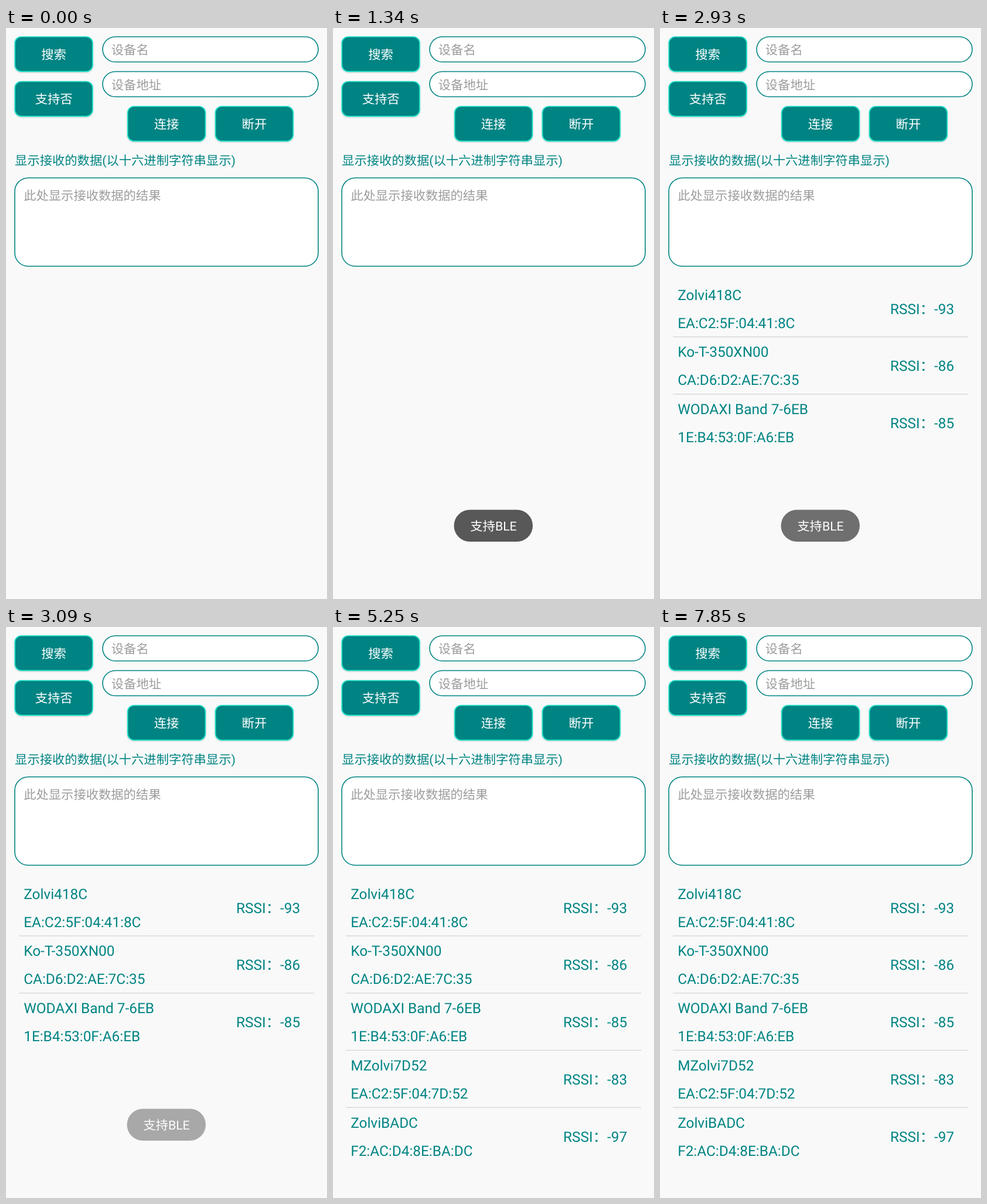
Recreate the animation shown at these times as an HTML page. Size 548x976 px, loop 8 s.

```html
<!DOCTYPE html>
<html lang="zh-CN">
<head>
<meta charset="utf-8">
<style>
html, body { margin: 0; height: 100%; overflow: hidden; background: #f9f9f9; }
svg {
  display: block; width: 100vw; height: 100vh; fill: #008483;
  font: 21.31px Roboto, "Noto Sans CJK SC", sans-serif; text-rendering: geometricPrecision;
}
.field { fill: #fff; stroke: #008483; stroke-width: 1.6; }
.hint { fill: #9c9c9c; }
.button rect { fill: #008483; stroke: #1ce6cb; stroke-width: 1.7; }
.button text, #toast text { fill: #fff; text-anchor: middle; }
.row { font-size: 24.36px; }
.row path { stroke: #dadada; stroke-width: 1.6; }
</style>
</head>
<body>
<svg id="stage" viewBox="0 0 548 976"></svg>
<script>
const LOOP = 8000, ROW_HEIGHT = 97.75, FADE = 500;
const TOAST_IN = 744, TOAST_OUT = 2737;
const LEFT = 15.1, INDENT = 30.2;

const text = (x, y, label, cls = "") => `<text x="${x}" y="${y}" class="${cls}">${label}</text>`;
const rect = (x, y, w, h, r, cls = "") =>
  `<rect x="${x}" y="${y}" width="${w}" height="${h}" rx="${r}" class="${cls}"/>`;
const button = (id, x, y, label) =>
  `<g class="button" id="${id}">${rect(x, y, 132.7, 59.3, 11)}${text(x + 66.4, y + 37.9, label)}</g>`;

const devices = [
  { at: 2240, name: "Zolvi418C", address: "EA:C2:5F:04:41:8C", rssi: -93 },
  { at: 2760, name: "Ko-T-350XN00", address: "CA:D6:D2:AE:7C:35", rssi: -86 },
  { at: 2920, name: "WODAXI Band 7-6EB", address: "1E:B4:53:0F:A6:EB", rssi: -85 },
  { at: 3740, name: "MZolvi7D52", address: "EA:C2:5F:04:7D:52", rssi: -83 },
  { at: 3820, name: "ZolviBADC", address: "F2:AC:D4:8E:BA:DC", rssi: -97 }
];
const row = ({ name, address, rssi }, i) =>
  `<g class="row" transform="translate(0 ${i * ROW_HEIGHT})">
    ${i ? '<path d="M22 430.2H526"/>' : ""}
    ${text(INDENT, 464.6, name)}${text(INDENT, 512.6, address)}${text(393.1, 488.6, "RSSI：" + rssi)}
  </g>`;

const stage = document.getElementById("stage");
stage.innerHTML =
  button("search", 15.2, 15, "搜索") +
  button("support", 15.2, 91.5, "支持否") +
  button("connect", 207.7, 134, "连接") +
  button("disconnect", 357.5, 134, "断开") +
  rect(165, 15, 368, 43, 21.5, "field") + text(179.8, 45.3, "设备名", "hint") +
  rect(165, 74.5, 368, 43, 21.5, "field") + text(179.8, 104.6, "设备地址", "hint") +
  text(LEFT, 234.3, "显示接收的数据(以十六进制字符串显示)") +
  rect(15, 256.2, 518, 151, 23, "field") + text(INDENT, 293.7, "此处显示接收数据的结果", "hint") +
  devices.map(row).join("") +
  `<g id="toast">${rect(206.5, 823.5, 134.5, 54.5, 27.2)}${text(274, 858.6, "支持BLE")}</g>`;

const rows = [...stage.querySelectorAll(".row")];
const buttons = [...stage.querySelectorAll(".button")];
const toast = document.getElementById("toast");
toast.firstChild.style.fill = "#585858";

const pressTimes = { support: 610, search: 2120 };
const clamp = v => Math.min(1, Math.max(0, v));

function draw(t) {
  rows.forEach((el, i) => el.style.display = t >= devices[i].at ? "" : "none");
  // Decelerating fade in, accelerating fade out
  const enter = clamp((t - TOAST_IN) / FADE), leave = clamp((t - TOAST_OUT) / FADE);
  toast.style.opacity = 1 - (1 - enter) ** 2 - leave ** 2;
  // A pressed button lifts slightly, which deepens its shadow
  buttons.forEach(el => {
    const since = t - pressTimes[el.id];
    const lift = since >= 0 ? clamp(since / 100) * clamp((240 - since) / 100) : 0;
    el.style.filter = `drop-shadow(0 ${1 + lift}px ${1 + lift}px rgba(0,0,0,.2))`;
  });
}

function tick() {
  draw(performance.now() % LOOP);
  requestAnimationFrame(tick);
}
tick();
</script>
</body>
</html>
```
